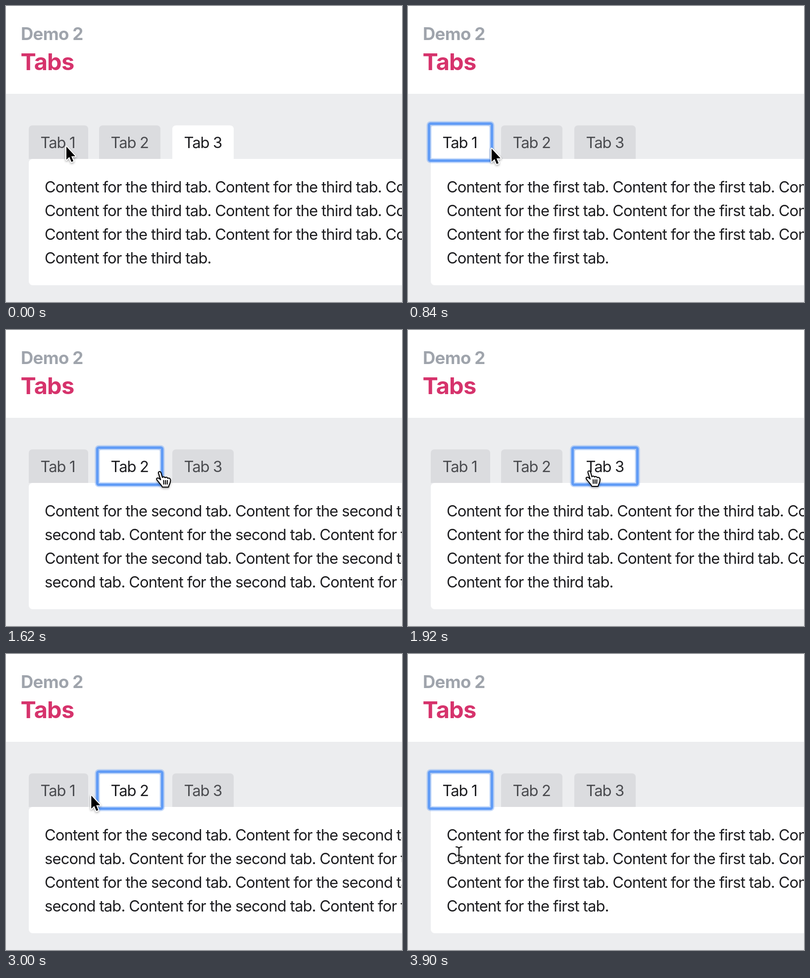
Write an HTML page that moves like this. It is 800 px wide and 600 px high and loops after 3960 ms.

```html
<!DOCTYPE html>
<html lang="en">
<head>
<meta charset="utf-8">
<title>Tabs</title>
<style>
  html, body { margin: 0; width: 100%; height: 100%; overflow: hidden; background: #fff; }
  svg { display: block; width: 800px; height: 600px; }
  text {
    font-family: Inter, "Liberation Sans", sans-serif;
    font-size: 31px;
    font-optical-sizing: none;
    letter-spacing: -.9px;
    fill: #1d1d20;
    white-space: pre;
  }
  .kicker { font-size: 35px; font-weight: 700; letter-spacing: -.7px; fill: #9fa4ac; }
  .title { font-size: 47px; font-weight: 700; letter-spacing: -.8px; fill: #d6336c; }
  .tab path { fill: #dbdcdf; }
  .tab text { letter-spacing: -1.1px; fill: #4a4b4f; }
  .tab.hover path { fill: #cdced0; }
  .tab.on path { fill: #fff; }
  .tab.on text { fill: #1d1d20; }
  #ring rect { fill: none; stroke: #619cf6; }
  #ring .halo { stroke-width: 10; stroke-opacity: .4; }
  #ring .line { stroke-width: 5; }
  .shadow { filter: drop-shadow(0 2px 2px rgba(0, 0, 0, .35)); }
  .ink { fill: none; stroke: #000; stroke-width: 2; stroke-linecap: round; stroke-linejoin: round; }
</style>
</head>
<body>
<svg viewBox="0 0 800 600">
  <rect width="800" height="600" fill="#fff"/>
  <text class="kicker" x="30" y="68.5">Demo 2</text>
  <text class="title" x="29.5" y="130">Tabs</text>
  <rect y="178" width="800" height="422" fill="#ecedef"/>
  <g id="tabs"></g>
  <rect x="46" y="310" width="900" height="256" rx="8" fill="#fff"/>
  <g id="content"></g>
  <g id="ring">
    <rect class="halo" y="238.5" height="75" rx="3"/>
    <rect class="line" y="238.5" height="75" rx="3"/>
  </g>
  <g id="cursor">
    <g id="arrow" class="shadow">
      <path d="M0 0V26.5L6 21L10.2 31L14 29.5L10 19.5H18Z" fill="#000" stroke="#fff" stroke-width="4" stroke-linejoin="round" paint-order="stroke"/>
    </g>
    <g id="hand" class="shadow">
      <path class="ink" style="fill:#fff" d="M-2.5 1.5C-3-2 1.5-2.5 2.8 1L5.5 10.5C7 8.5 10 9 11 11C13 9.3 15.3 10 16.3 12.2C19.5 11 22.3 13 22 16.5C21.8 19 21.3 21.5 20.3 23.5C19 26 18.2 27.5 18 30H5.5C4.5 27 0 22.5-3.5 18C-6.5 14.8-7 12.6-5 11.8C-2.5 11 0 13 2 15.2Z"/>
      <path class="ink" d="M8 16.5L8.3 24M11.8 16.5V24M15.5 16.5L15.3 24"/>
    </g>
    <g id="beam">
      <path class="ink" style="stroke:#fff;stroke-width:4"/>
      <path class="ink"/>
    </g>
  </g>
</svg>
<script>
const LOOP = 3960, STEP = 60;
const NS = 'http://www.w3.org/2000/svg';
const $ = id => document.getElementById(id);

function add(parent, tag, attrs, label) {
  const node = document.createElementNS(NS, tag);
  for (const key in attrs) node.setAttribute(key, attrs[key]);
  if (label) node.textContent = label;
  return parent.appendChild(node);
}

const tabs = [[46, 120], [188, 124], [336, 124]].map(([x, w], i) => {
  const node = add($('tabs'), 'g', { class: 'tab' });
  add(node, 'path', { d: `M${x} 310V250q0-8 8-8h${w - 16}q8 0 8 8V310Z` });
  add(node, 'text', { x: x + 23.5, y: 288 }, `Tab ${i + 1}`);
  return { x, w, node };
});

const panels = ['first', 'second', 'third'].map(name => {
  const sentence = `Content for the ${name} tab. `;
  const full = sentence.repeat(3);
  const lines = name === 'second'
    ? [full, 'second tab. ' + full, full, 'second tab. ' + full]
    : [full, full, full, sentence];
  const node = add($('content'), 'g', {});
  lines.forEach((line, i) => add(node, 'text', { x: 78, y: 378 + i * 48 }, line));
  return node;
});

for (const path of $('beam').children) {
  path.setAttribute('d', 'M-6-15Q0-15 0-11Q0-15 6-15M0-11V11M-6 15Q0 15 0 11Q0 15 6 15M-2.5 2H2.5');
}

// time, selected tab, focused tab (-1 for none)
const states = [
  [0, 2, -1], [240, 2, 0], [360, 0, 0],
  [1080, 0, 1], [1200, 1, 1],
  [1740, 1, 2], [1860, 2, 2],
  [2520, 2, 1], [2640, 1, 1],
  [3360, 1, 0], [3480, 0, 0]
];

// start, end, x, y reached at the end
const moves = [
  [0, 0, 122, 285], [0, 240, 97, 286],
  [660, 960, 208, 291], [1440, 1740, 366, 287],
  [2160, 2460, 274, 286], [2820, 3150, 95, 288],
  [3720, 3900, 103, 406]
];

function pointer(t) {
  let [, , x, y] = moves[0];
  for (const [from, to, tx, ty] of moves.slice(1)) {
    if (t <= from) break;
    const u = Math.min(1, (t - from) / (to - from));
    const k = u * u * (3 - 2 * u);
    x += (tx - x) * k;
    y += (ty - y) * k;
  }
  return [x, y];
}

const show = (node, on) => node.setAttribute('visibility', on ? 'visible' : 'hidden');

function draw(ms) {
  const t = Math.floor((ms % LOOP) / STEP) * STEP;
  const [, selected, focus] = states.filter(s => s[0] <= t).pop();
  const [x, y] = pointer(t);
  const over = t < STEP || y > 310 ? -1 : tabs.findIndex(tab => x >= tab.x && x <= tab.x + tab.w);

  tabs.forEach((tab, i) => {
    tab.node.classList.toggle('on', i === selected);
    tab.node.classList.toggle('hover', i === over);
    show(panels[i], i === selected);
  });

  show($('ring'), focus >= 0);
  if (focus >= 0) {
    for (const rect of $('ring').children) {
      rect.setAttribute('x', tabs[focus].x - 3.5);
      rect.setAttribute('width', tabs[focus].w + 7);
    }
  }

  const kind = over >= 0 ? 'hand' : y > 342 ? 'beam' : 'arrow';
  for (const id of ['arrow', 'hand', 'beam']) show($(id), id === kind);
  $('cursor').setAttribute('transform', `translate(${x.toFixed(1)} ${y.toFixed(1)})`);
}

const start = performance.now();
function tick() {
  draw(performance.now() - start);
  requestAnimationFrame(tick);
}
tick();
</script>
</body>
</html>
```
